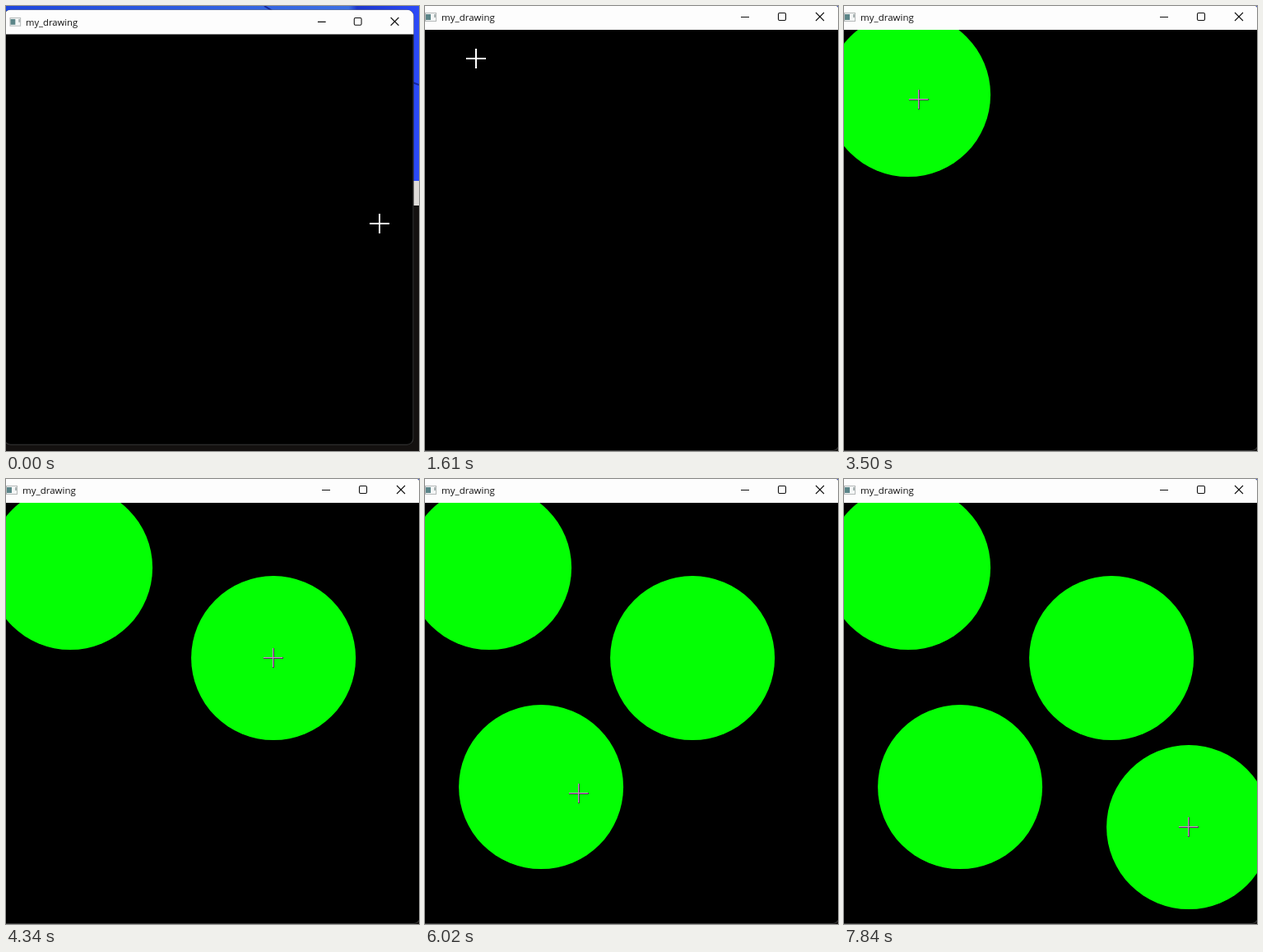
Animation of 502 by 542 pixels, one loop 7910 ms. Source, as an HTML page with a canvas:

```html
<!DOCTYPE html>
<html lang="en">
<head>
<meta charset="utf-8">
<title>my_drawing</title>
<style>
  html, body { margin: 0; width: 100%; height: 100%; overflow: hidden; background: #000; }
  canvas { display: block; }
</style>
</head>
<body>
<canvas id="stage" width="502" height="542"></canvas>
<script>
const ctx = document.getElementById('stage').getContext('2d');
const LOOP = 7910, STEP = 70, RADIUS = 100, BAR = 29;

// Places where the pointer rests; a click there leaves a disc.
const rests = [
  { x: 454, y: 265, arrive: 0, leave: 1050 },
  { x: 62, y: 64, arrive: 1610, leave: 1890 },
  { x: 78, y: 108, arrive: 2520, leave: 3400, click: 2870 },
  { x: 325, y: 218, arrive: 4130, leave: 4690, click: 4200 },
  { x: 141, y: 375, arrive: 5390, leave: 5850, click: 5740 },
  { x: 419, y: 424, arrive: 6510, leave: LOOP, click: 7140 }
];

const smooth = p => p * p * (3 - 2 * p);

function pointerAt(t) {
  const next = rests.findIndex(r => t < r.leave);
  const to = rests[next], from = rests[next - 1] || to;
  if (t >= to.arrive) return to;
  const e = smooth((t - from.leave) / (to.arrive - from.leave));
  return {
    x: Math.round(from.x + (to.x - from.x) * e),
    y: Math.round(from.y + (to.y - from.y) * e)
  };
}

function rect(color, x, y, w, h) {
  ctx.fillStyle = color;
  ctx.fillRect(x, y, w, h);
}

function line(x0, y0, x1, y1) {
  ctx.beginPath();
  ctx.moveTo(x0, y0);
  ctx.lineTo(x1, y1);
  ctx.stroke();
}

function drawDesktop() {
  rect('#141110', 0, 0, 502, 542);
  const sky = ctx.createLinearGradient(0, 0, 502, 0);
  sky.addColorStop(0, '#1d46dc');
  sky.addColorStop(0.83, '#3c70e4');
  sky.addColorStop(0.85, '#1b35cc');
  sky.addColorStop(1, '#2b4af8');
  rect(sky, 0, 0, 502, 213);
  ctx.strokeStyle = '#14259c';
  ctx.lineWidth = 2;
  line(314, 0, 324, 6);
  line(494, 93, 502, 96);
  rect('#dedbd8', 490, 213, 12, 30);
}

function drawButtons() {
  const y = 13, half = 5;
  const [minimize, maximize, close] = [389, 434, 480];
  ctx.strokeStyle = '#111';
  ctx.lineWidth = 1.1;
  line(minimize - half, y + 0.5, minimize + half, y + 0.5);
  ctx.beginPath();
  ctx.roundRect(maximize - 4.5, y - 4.5, 9, 9, 1.5);
  ctx.stroke();
  line(close - half, y - half, close + half, y + half);
  line(close + half, y - half, close - half, y + half);
}

function drawTitleBar() {
  rect('#fdfdfd', -8, -2, 520, BAR + 2);

  rect('#b4b8b8', 0, 8, 14, 11);
  rect('#f4f6f6', 1, 9, 12, 9);
  rect('#5b8588', 1, 10, 6, 7);
  rect('#a9b4b4', 11, 10, 2, 4);

  ctx.fillStyle = '#111';
  ctx.font = '11.5px "Open Sans", "Noto Sans", sans-serif';
  ctx.fillText('my_drawing', 20, 18);
  drawButtons();
}

function drawWindow(t) {
  const shrink = Math.pow(1 - Math.min(1, t / 350), 3);
  const scale = 1 - 0.025 * shrink;
  ctx.save();
  ctx.setTransform(scale, 0, 0, scale, 4.5 * shrink, 6.2 * shrink);
  ctx.beginPath();
  ctx.roundRect(-7, -1.5, 510.5, 543.5, 8);
  ctx.clip();
  rect('#000', -8, -2, 520, 560);
  ctx.strokeStyle = '#3a3a3a';
  ctx.lineWidth = 2;
  ctx.stroke();
  drawTitleBar();
  ctx.restore();
}

function drawDiscs(discs) {
  ctx.save();
  ctx.beginPath();
  ctx.rect(0, BAR, 502, 542 - BAR);
  ctx.clip();
  ctx.fillStyle = '#04ff04';
  for (const { x, y } of discs) {
    ctx.beginPath();
    ctx.arc(x + 0.1, y + 0.1, RADIUS, 0, 2 * Math.PI);
    ctx.fill();
  }
  ctx.restore();
}

function drawCross(x, y, size, width, color) {
  rect(color, x - size / 2, y - width / 2, size, width);
  rect(color, x - width / 2, y - size / 2, width, size);
}

function drawPointer(t, discs) {
  const { x, y } = pointerAt(t);
  const onDisc = discs.some(d => Math.hypot(x - d.x, y - d.y) < RADIUS);
  drawCross(x, y, 24, 2, onDisc ? '#5a3060' : '#fff');
  if (onDisc) drawCross(x - 0.5, y - 0.5, 23, 1, '#c890c8');
}

function draw(now) {
  const t = Math.floor((now % LOOP) / STEP) * STEP;
  const discs = rests.filter(r => t >= r.click);
  drawDesktop();
  drawWindow(t);
  drawDiscs(discs);
  drawPointer(t, discs);
}

let start;
function tick(now) {
  start ??= now;
  draw(Math.max(0, now - start));
  requestAnimationFrame(tick);
}
draw(0);
requestAnimationFrame(tick);
</script>
</body>
</html>
```
